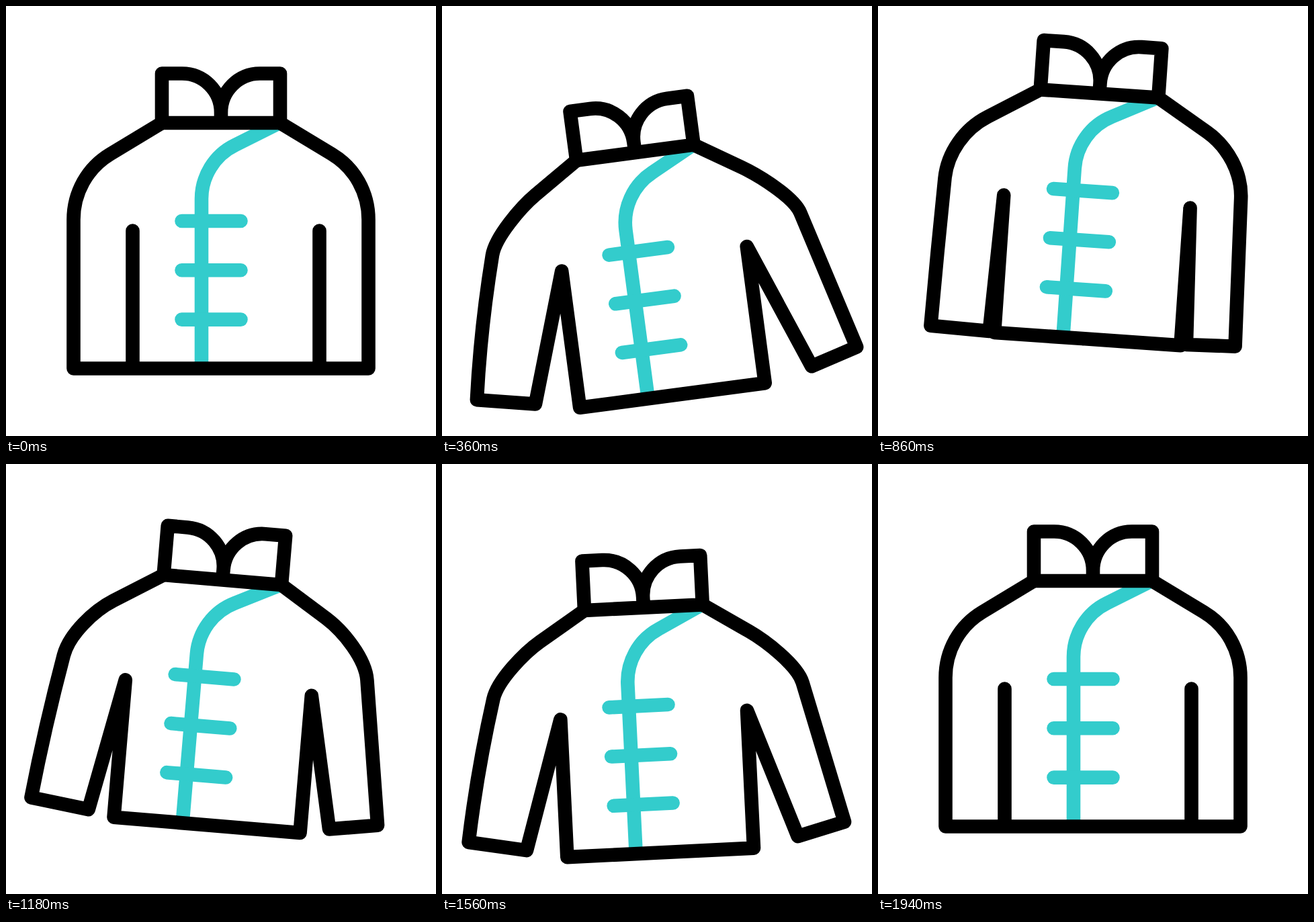
An HTML page that plays this animation: 640x640 px, repeating every 2.4 s.

```html
<!DOCTYPE html>
<html lang="en">
<head>
<meta charset="utf-8">
<title>Dancing jacket</title>
<style>
  html, body { margin: 0; width: 100%; height: 100%; overflow: hidden; background: #fff; }
  svg { display: block; width: 100%; height: 100%; }
  path { fill: none; stroke: #000; stroke-width: 20.6; stroke-linejoin: round; }
  .trim { stroke: #3cc; }
  .bars, #coat { stroke-linecap: round; }
</style>
</head>
<body>
<svg viewBox="0 0 640 640">
  <g id="jacket">
    <path class="trim" d="M405 175L341 207C310 222 291 254 291 287V539"/>
    <path class="trim bars" d="M261.5 320h88m-88 73.300h88m-88 73.300h88"/>
    <path id="coat"/>
    <path d="M320 174V158.500A58 58 0 0 0 262 100.500H232V174H408V100.500H378A58 58 0 0 0 320 158.500"/>
  </g>
</svg>
<script>
const LOOP = 2400, MID = 320, HEM = 539.5, DROP = 52;
const BEATS = [0, 492, 948, 1420, 1862];
const TILT_BEATS = [0, 595, 980, 1510, 1940]; // the tilt trails the bounce
const jacket = document.getElementById('jacket');
const coat = document.getElementById('coat');

// Eases in and out from one value to the next.
function swing(t, beats, values) {
  const i = beats.findIndex(b => b > t);
  if (i < 0) return values.at(-1);
  const f = (t - beats[i - 1]) / (beats[i] - beats[i - 1]);
  return values[i - 1] + (values[i] - values[i - 1]) * f * f * (3 - 2 * f);
}

// Sideways drift bends along the way up and down.
function drift(t, y) {
  const s = y / DROP;
  const bouncing = t > BEATS[1] && t < BEATS[3];
  return bouncing ? -10.3 - 7.85 * s + 4.35 * s * s : -13.8 * s * (2 - s);
}

// Steps from a towards b by a length.
function toward(a, b, length) {
  const dx = b[0] - a[0], dy = b[1] - a[1], k = length / Math.hypot(dx, dy);
  return [a[0] + dx * k, a[1] + dy * k];
}

// Half a coat, x counted outward from the middle; lift raises the sleeve.
function half(side, armpit, lift, bow) {
  const collar = [88, 174];
  const shoulder = [165 - 9.5 * lift, 220.5 - 3.5 * lift];
  const elbow = [219.5 + 11 * lift, 318 - 20 * lift];
  const cuff = [219.5 + 61 * lift, HEM - 31 * lift];
  const inner = [armpit + 63.5 * lift, HEM - 13.7 * lift];
  const bend = [(elbow[0] + cuff[0]) / 2 + bow * lift, (elbow[1] + cuff[1]) / 2];
  const handle = 40 - 12 * lift;
  const out = toward(shoulder, collar, -handle);
  const back = toward(elbow, bend, -handle);
  const at = (...points) => points.map(([x, y]) => `${MID + side * x} ${y}`).join(' ');
  return `M${at(collar, shoulder)}C${at(out, back, elbow)}Q${at(bend, cuff)}` +
    `L${at(inner, [armpit, 334.5], [armpit, HEM], [0, HEM])}`;
}

function draw(now) {
  const t = now % LOOP;
  const y = swing(t, BEATS, [0, DROP, -54, DROP, 0]);
  const tilt = swing(t, TILT_BEATS, [0, -11.5, 8.5, -2.9, 0]);
  const lift = swing(t, BEATS, [0, 1.24, 0, 1.24, 0]);
  jacket.setAttribute('transform', `translate(${drift(t, y)} ${y}) rotate(${tilt} ${MID} ${MID})`);
  coat.setAttribute('d', half(-1, 131.5, lift, 6) + half(1, 146.5, lift * 1.11, 0));
  requestAnimationFrame(draw);
}
draw(performance.now());
</script>
</body>
</html>
```
